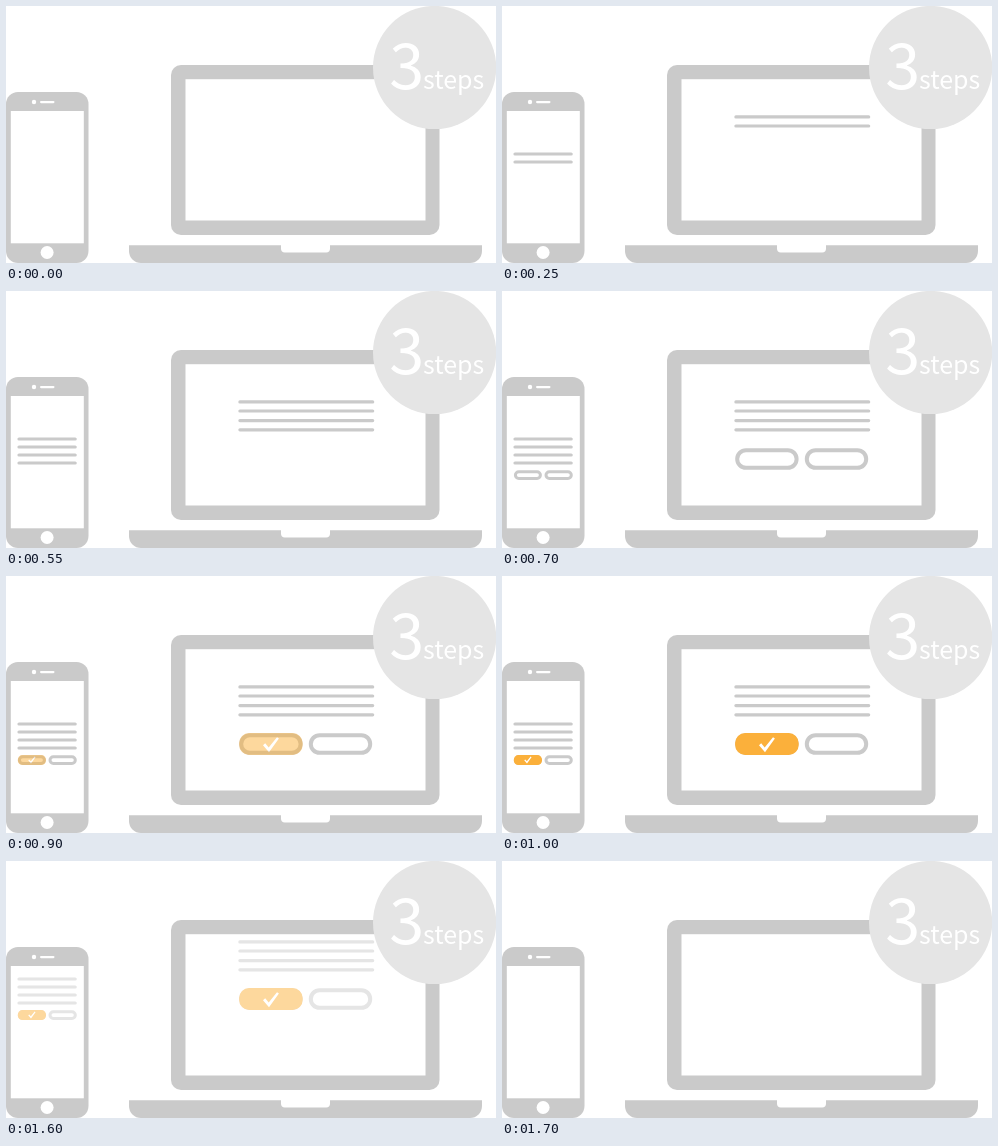
These frames come from a looping animation (490x257 px, 1.8 s). An HTML page without scripts:

```html
<!DOCTYPE html>
<html lang="en">
<head>
<meta charset="utf-8">
<title>3 steps</title>
<style>
  html, body { margin: 0; width: 100%; height: 100%; overflow: hidden; background: #fff; }
  svg { display: block; width: 490px; height: 257px; }
  .body { fill: #cacaca; }
  .gap { fill: #fff; }
  .line { stroke: #cacaca; stroke-width: 3.2; stroke-linecap: round; }
  .pill { fill: #fff; stroke: #cacaca; stroke-width: 4; }
  .small { stroke-width: 3; }
  .badge text { fill: #fff; font-family: "Noto Sans CJK JP", "Noto Sans CJK", "Noto Sans", sans-serif; }

  .page, .step { animation: 1.8s step-end infinite; }
  .page { animation-name: leave; }
  .s1 { animation-name: s1; }
  .s2 { animation-name: s2; }
  .s3 { animation-name: s3; }
  .s4 { animation-name: s4; }
  .s5 { animation-name: s5; }
  .s6 { animation-name: pick; }

  @keyframes s1 { 0% { opacity: 0 } 5.55%, 100% { opacity: 1 } }
  @keyframes s2 { 0% { opacity: 0 } 13.88%, 100% { opacity: 1 } }
  @keyframes s3 { 0% { opacity: 0 } 22.22%, 100% { opacity: 1 } }
  @keyframes s4 { 0% { opacity: 0 } 30.55%, 100% { opacity: 1 } }
  @keyframes s5 { 0% { opacity: 0 } 38.88%, 100% { opacity: 1 } }
  @keyframes pick { 0% { opacity: 0 } 49.99% { opacity: .5 } 55.55%, 100% { opacity: 1 } }
  @keyframes leave {
    0% { transform: none; opacity: 1 }
    83.33% { transform: translateY(-30px); opacity: 1 }
    88.88% { transform: translateY(-30px); opacity: .5 }
    94.44%, 100% { transform: translateY(-30px); opacity: 0 }
  }
</style>
</head>
<body>
<svg viewBox="0 0 490 257">
  <defs>
    <path id="tick" d="M-8 .2-5.8-1.7-2.3 2.4 6-7.8 7.9-6.4-2 7.2Z" fill="#fff"/>
  </defs>

  <g class="phone">
    <rect class="body" y="86" width="82.5" height="171" rx="12"/>
    <rect class="gap" x="4.8" y="105" width="73" height="132.3"/>
    <circle class="gap" cx="28" cy="96" r="2.2"/>
    <rect class="gap" x="34" y="95" width="14.5" height="2.2" rx="1.1"/>
    <circle class="gap" cx="41.1" cy="246.5" r="6.5"/>
  </g>

  <g class="laptop">
    <rect class="body" x="165" y="59" width="268.5" height="170" rx="10"/>
    <rect class="gap" x="179.5" y="73.2" width="240" height="141.3"/>
    <path class="body" d="M123 239.2H476V245a12 12 0 0 1-12 12H135a12 12 0 0 1-12-12Z"/>
    <path class="gap" d="M275 239H324V242.4a4 4 0 0 1-4 4H279a4 4 0 0 1-4-4Z"/>
  </g>

  <g class="page">
    <path class="line step s1" d="M13 148H69.2M233.9 110.9H366.7"/>
    <path class="line step s2" d="M13 156H69.2M233.9 120H366.7"/>
    <path class="line step s3" d="M13 164H69.2M233.9 129.6H366.7"/>
    <path class="line step s4" d="M13 172H69.2M233.9 138.8H366.7"/>
    <g class="step s5">
      <rect class="pill small" x="13.4" y="180.7" width="25" height="6.8" rx="3.4"/>
      <rect class="pill small" x="44" y="180.7" width="25.3" height="6.8" rx="3.4"/>
      <rect class="pill" x="235.2" y="159.2" width="59.4" height="17.6" rx="8.8"/>
      <rect class="pill" x="304.8" y="159.2" width="59.4" height="17.6" rx="8.8"/>
    </g>
    <g class="step s6">
      <rect x="11.8" y="179.1" width="28.2" height="10" rx="4.6" fill="#fbb03b"/>
      <rect x="233.1" y="157.1" width="63.6" height="21.8" rx="10" fill="#fbb03b"/>
      <use href="#tick" transform="translate(25.9 184.2) scale(.46)"/>
      <use href="#tick" x="265" y="169"/>
    </g>
  </g>

  <g class="badge">
    <circle cx="428.6" cy="61.5" r="61.6" fill="#e5e5e5"/>
    <text x="383.3" y="83" font-size="63">3</text>
    <text x="417" y="83" font-size="25">steps</text>
  </g>
</svg>
</body>
</html>
```
